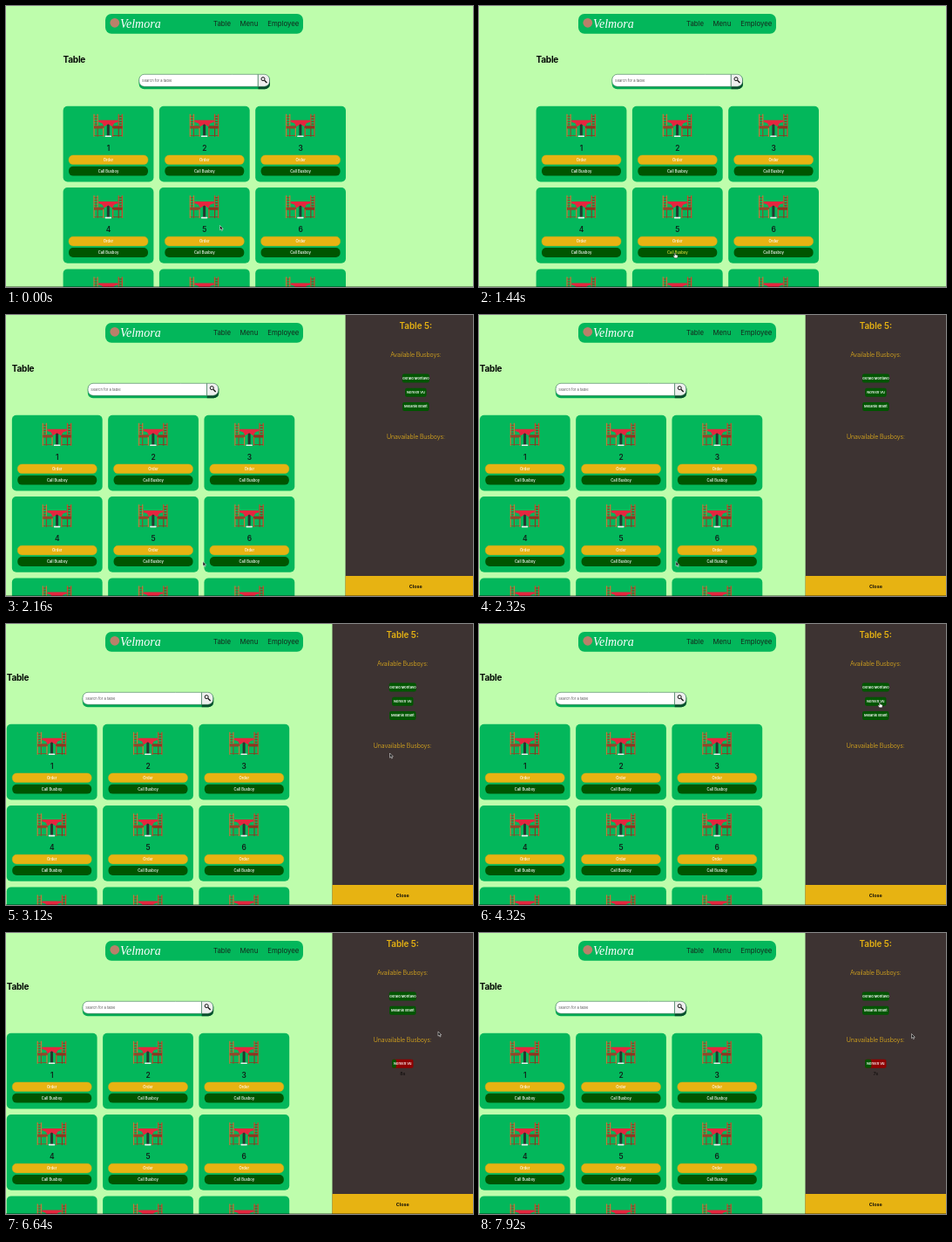
Write an HTML page that moves like this. It is 536x322 px and loops after 8000 ms.

```html
<!DOCTYPE html>
<html lang="en">
<head>
<meta charset="utf-8">
<title>Table service</title>
<style>
  html, body { margin: 0; width: 100%; height: 100%; overflow: hidden; background: #befdac; }
  svg { display: block; font-family: Inter, "Open Sans", sans-serif; }
  .mid { text-anchor: middle; }
  .btn { font-size: 4.2px; font-weight: 500; fill: #fff; }
  .chip { font-size: 4px; font-weight: 600; fill: #fff; }
  .thin { font-size: 7px; font-weight: 300; letter-spacing: -.14px; fill: #e8b21a; }
</style>
</head>
<body>
<svg id="stage" width="536" height="322" viewBox="0 0 536 322"></svg>
<script>
const LOOP = 8000, OPEN = 1833, OPEN_TIME = 510, CALL = 4640;
const PANEL_W = 161.5, SHIFT = 64.8, MID = 80.75;
const GREEN = '#03b75b', DARK = '#005500', GOLD = '#e7b312';
const CARD = { x: 65.6, y: 114.8, w: 103.8, h: 86.6, dx: 110.3, dy: 93.3 };

// Pointer stops: time, x, y
const path = [
  [0, 245.5, 251.5], [160, 245.5, 251.5], [1000, 225, 283], [1440, 225, 283],
  [1900, 226.5, 284], [2160, 226, 282.5], [2400, 226, 282.5], [3120, 440.5, 148],
  [3500, 452, 110], [4100, 460, 90], [4700, 460, 90], [5360, 490.5, 97],
  [6240, 495, 108], [6900, 496.5, 115.5], [LOOP, 496.5, 115.5]
];

const rect = (x, y, w, h, fill, r = 0, more = '') =>
  `<rect x="${x}" y="${y}" width="${w}" height="${h}" rx="${r}" fill="${fill}" ${more}/>`;
const text = (x, y, s, cls, more = '') =>
  `<text x="${x}" y="${y}" class="${cls}" ${more}>${s}</text>`;
const label = (x, y, s, size, weight, fill, more = '') =>
  text(x, y, s, '', `font-size="${size}" font-weight="${weight}" fill="${fill}" ${more}`);

function chair(back, wood) {
  let s = rect(0, 0, 1.3, 26, back) + rect(4.1, 0, 1.3, 14, back);
  for (let y = 2; y < 13; y += 3) s += rect(1.2, y, 3, 1.1, wood);
  return s + rect(.6, 13.5, 11.4, 3.2, wood) + rect(4.2, 16, 1.1, 10, wood) +
    rect(10.7, 16, 1.3, 10, back) + rect(1, 24.3, 10, .8, wood);
}

function icon() {
  return chair('#c4783c', '#95462a') +
    `<g transform="translate(33.6) scale(-1 1)">${chair('#c94b2f', '#8f3520')}</g>` +
    rect(15.4, 10, 3, 15, '#27372f') +
    '<path d="M5.8 7h22.2v2.2l-4 1.2-2.5 4-4.6-3-4.6 3-2.4-4-4.1-1.2z" fill="#e5263f"/>' +
    rect(13.2, 24.6, 7.4, 1.7, '#e8f0ec', .6);
}

function card(n) {
  const x = CARD.x + n % 3 * CARD.dx, y = CARD.y + Math.floor(n / 3) * CARD.dy, c = CARD.w / 2;
  return `<g transform="translate(${x} ${y})">` +
    rect(0, 0, CARD.w, CARD.h, GREEN, 5) +
    `<g transform="translate(34.8 9)">${icon()}</g>` +
    label(c, 51.2, n + 1, 8.4, 600, '#10201a', 'text-anchor="middle"') +
    rect(6.4, 56.2, 91, 10.6, GOLD, 5, 'stroke="#c9a81c" stroke-width=".5"') +
    text(c, 63, 'Order', 'btn mid') +
    rect(6.4, 69, 91, 10.8, DARK, 5) +
    text(c, 75.9, 'Call Busboy', 'btn mid', `id="call${n + 1}"`) + '</g>';
}

const chip = (id, y, w, name) =>
  `<g id="${id}" transform="translate(${MID} ${y})">` +
  rect(-w / 2, -5, w, 10, DARK, 2) + rect(-w / 2, -5, 0, 10, DARK, 2) +
  text(0, 1.4, name, 'chip mid') + '</g>';

const header =
  rect(114, 9, 227, 22.8, GREEN, 7) +
  '<circle cx="124.8" cy="19.3" r="5.4" fill="#b9806a"/>' +
  label(131, 25, 'Velmora', 14, 400, '#fff', `font-style="italic" font-family="'Liberation Serif', serif"`) +
  [[238, 'Table'], [268.5, 'Menu'], [300.3, 'Employee']]
    .map(([x, s]) => label(x, 23, s, 7.8, 400, '#14291c')).join('');

const search =
  rect(152.6, 79, 150.4, 16.2, '#02a854', 6) +
  '<path d="M289.5 84h13.5v5.2a6 6 0 0 1-6 6h-7.5z" fill="#064f2c"/>' +
  '<path d="M289.3 78.3h-30H158.8a6 6 0 0 0-6 6v2a6 6 0 0 0 6 6h130.5z" fill="#fff" stroke="#3c7657" stroke-width=".6"/>' +
  '<path d="M289.3 78.3h7.2a6 6 0 0 1 6 6v2a6 6 0 0 1-6 6h-7.2z" fill="#efefef" stroke="#3c7657" stroke-width=".6"/>' +
  '<path d="M296.6 85.2l2.8 2.8" stroke="#111" stroke-width="1.3"/>' +
  '<circle cx="295" cy="83.6" r="2" fill="none" stroke="#111" stroke-width="1"/>' +
  label(156, 86.5, 'Search for a table', 4.1, 400, '#555');

const panel =
  rect(0, 0, PANEL_W + 1, 322, '#3d3332') +
  label(MID, 16.2, 'Table 5:', 9.8, 600, GOLD, 'text-anchor="middle"') +
  text(MID, 47.6, 'Available Busboys:', 'thin mid') +
  text(MID, 141.6, 'Unavailable Busboys:', 'thin mid', 'id="away"') +
  chip('first', 72.5, 31, 'Gerald Montavo') +
  chip('second', 88.8, 24.4, 'Noreen Vu') +
  chip('third', 105, 30.4, 'Melanie Brant') +
  label(MID, 163, '', 5.4, 400, '#0b0808', 'text-anchor="middle" id="count"') +
  rect(0, 299, PANEL_W + 1, 23, GOLD) +
  label(MID, 312.5, 'Close', 5.4, 700, '#15110a', 'text-anchor="middle"');

const $ = id => document.getElementById(id);
$('stage').innerHTML = rect(0, 0, 536, 322, '#befdac') +
  `<g id="page">${label(65.6, 65, 'Table', 10, 700, '#050a06', 'letter-spacing="-.25"')}${search}` +
  Array.from({ length: 9 }, (_, n) => card(n)).join('') + '</g>' +
  header + `<g id="panel">${panel}</g>` +
  rect(0, 321.2, 536, .8, '#000', 0, 'opacity=".45"') +
  '<g id="pointer" stroke="#fff" stroke-width=".5" stroke-linejoin="round">' +
  '<path id="arrow" d="M0 0v5.2l1.2-1.1.9 2 .9-.4-.9-1.9h1.7z" fill="#111"/>' +
  '<path id="hand" d="M-.6 0q.6-.6 1.1 0v2l2.1.5q.7.3.5 1.2l-.5 2.1h-3l-1.7-2.3q.3-.8 1.5 0z" fill="#fff" stroke="#222" stroke-width=".4"/></g>';

// cubic-bezier(.4, 0, .2, 1), solved for its parameter by bisection
function ease(x) {
  if (x <= 0) return 0;
  if (x >= 1) return 1;
  let lo = 0, hi = 1, u;
  for (let i = 0; i < 24; i++) {
    u = (lo + hi) / 2;
    const bx = 1.2 * (1 - u) ** 2 * u + .6 * (1 - u) * u * u + u ** 3;
    if (bx < x) lo = u; else hi = u;
  }
  return u * u * (3 - 2 * u);
}

function pointerAt(t) {
  const i = path.findIndex((p, k) => k && t <= p[0]);
  const [t0, x0, y0] = path[i - 1], [t1, x1, y1] = path[i];
  const u = (t - t0) / (t1 - t0), k = u * u * (3 - 2 * u);
  return [x0 + (x1 - x0) * k, y0 + (y1 - y0) * k];
}

const move = (id, x, y) => $(id).setAttribute('transform', `translate(${x} ${y})`);

function draw(t) {
  const k = ease((t - OPEN) / OPEN_TIME), shift = -SHIFT * k;
  move('page', shift, 0);
  move('panel', 536 - PANEL_W * k, 0);

  const called = t >= CALL, secs = Math.max(0, Math.floor((t - CALL) / 1000));
  move('second', MID, called ? 149.8 : 88.8);
  move('third', MID, called ? 88.8 : 105);
  $('away').setAttribute('y', called ? 125.2 : 141.6);
  $('count').textContent = called ? 10 - secs + 's' : '';
  const [base, fill] = $('second').querySelectorAll('rect');
  base.setAttribute('fill', called ? '#8f0000' : DARK);
  fill.setAttribute('width', called ? 2.44 * secs : 0);

  const [x, y] = pointerAt(t);
  const over = (l, top, w, h) => x > l && x < l + w && y > top && y < top + h;
  const left = CARD.x + CARD.dx + 6.4 + shift, top = CARD.y + CARD.dy;
  const onCall = over(left, top + 69, 91, 10.8), onOrder = over(left, top + 56.2, 91, 10.6);
  const onChip = !called && over(443, 83.8, 24.4, 10);
  const hand = onCall || onOrder || onChip;
  $('call5').style.fill = onCall ? '#e6e23c' : '#fff';
  $('hand').style.display = hand ? '' : 'none';
  $('arrow').style.display = hand ? 'none' : '';
  move('pointer', x, y);
}

const start = performance.now();
function tick() {
  draw((performance.now() - start) % LOOP);
  requestAnimationFrame(tick);
}
tick();
</script>
</body>
</html>
```
